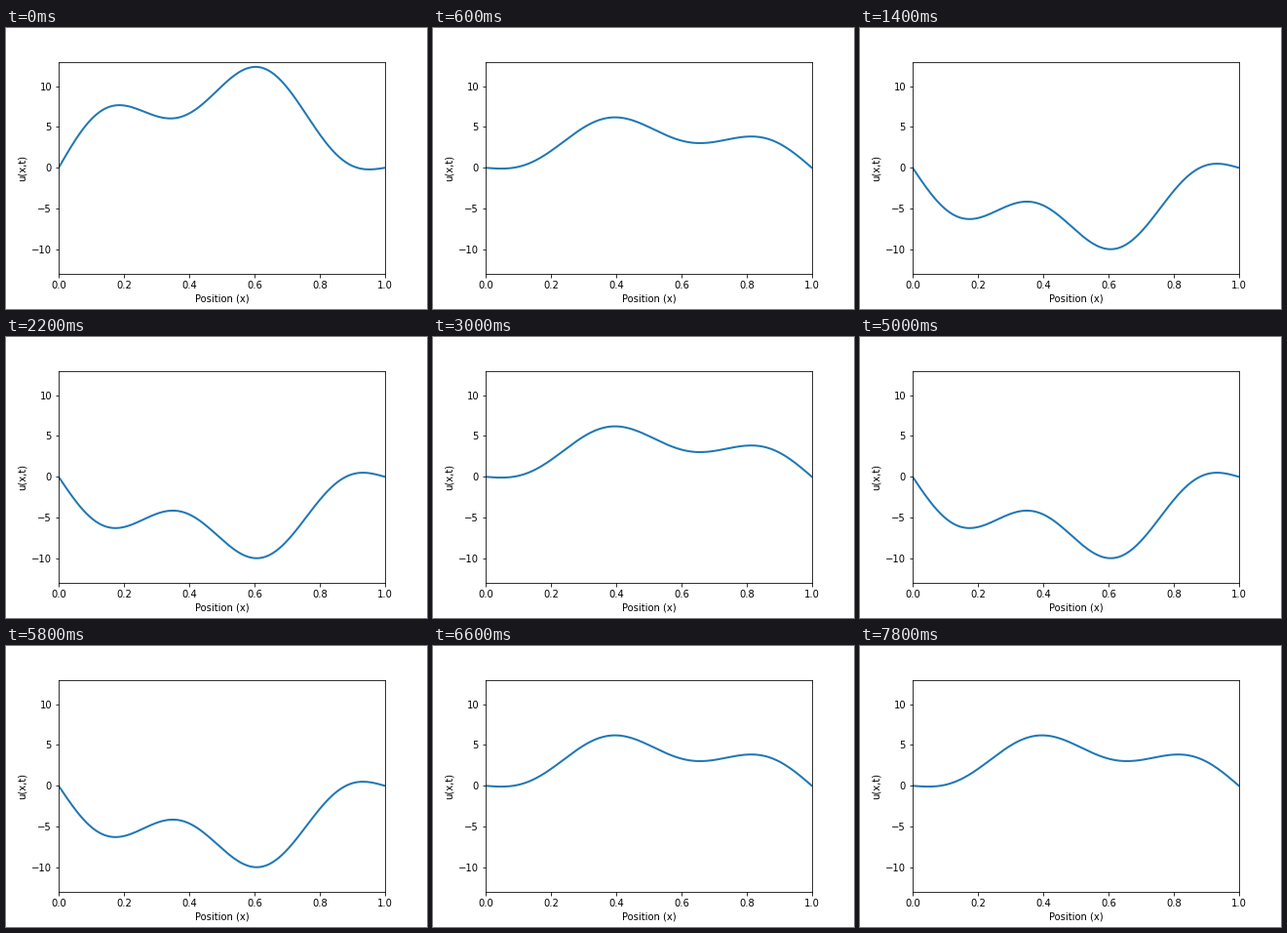
Recreate the animation shown at these times as a matplotlib script. Size 432 px wide and 288 px high, loop 8000 ms.

```python
import numpy as np
import matplotlib.pyplot as plt
from matplotlib.animation import FuncAnimation

FRAMES = 40
INTERVAL = 200            # ms per frame
PERIOD = 18               # frames per oscillation of the lowest mode
MODES = {1: 10, 4: 3}     # mode number: amplitude

x = np.linspace(0, 1, 201)


def wave(k):
    """Standing wave on a string with fixed ends."""
    phase = 2 * np.pi * k / PERIOD
    return sum(a * np.sin(n * np.pi * x) * np.cos(n * phase)
               for n, a in MODES.items())


plt.rcParams.update({"font.family": "DejaVu Sans", "font.size": 10})
fig = plt.figure(figsize=(6, 4), dpi=72, facecolor="white")
fig.subplots_adjust(left=0.125, right=0.9, bottom=0.125, top=0.88)
ax = fig.add_subplot()
ax.set(xlim=(0, 1), ylim=(-13, 13), xlabel="Position (x)", ylabel="u(x,t)")
ax.set_yticks([-10, -5, 0, 5, 10])
line, = ax.plot(x, wave(0), color="#1f77b4", lw=2)


def update(k):
    line.set_ydata(wave(k))
    return line,


anim = FuncAnimation(fig, update, frames=FRAMES, interval=INTERVAL,
                     init_func=lambda: update(0), repeat=True,
                     repeat_delay=0, blit=False)
plt.show()
```
